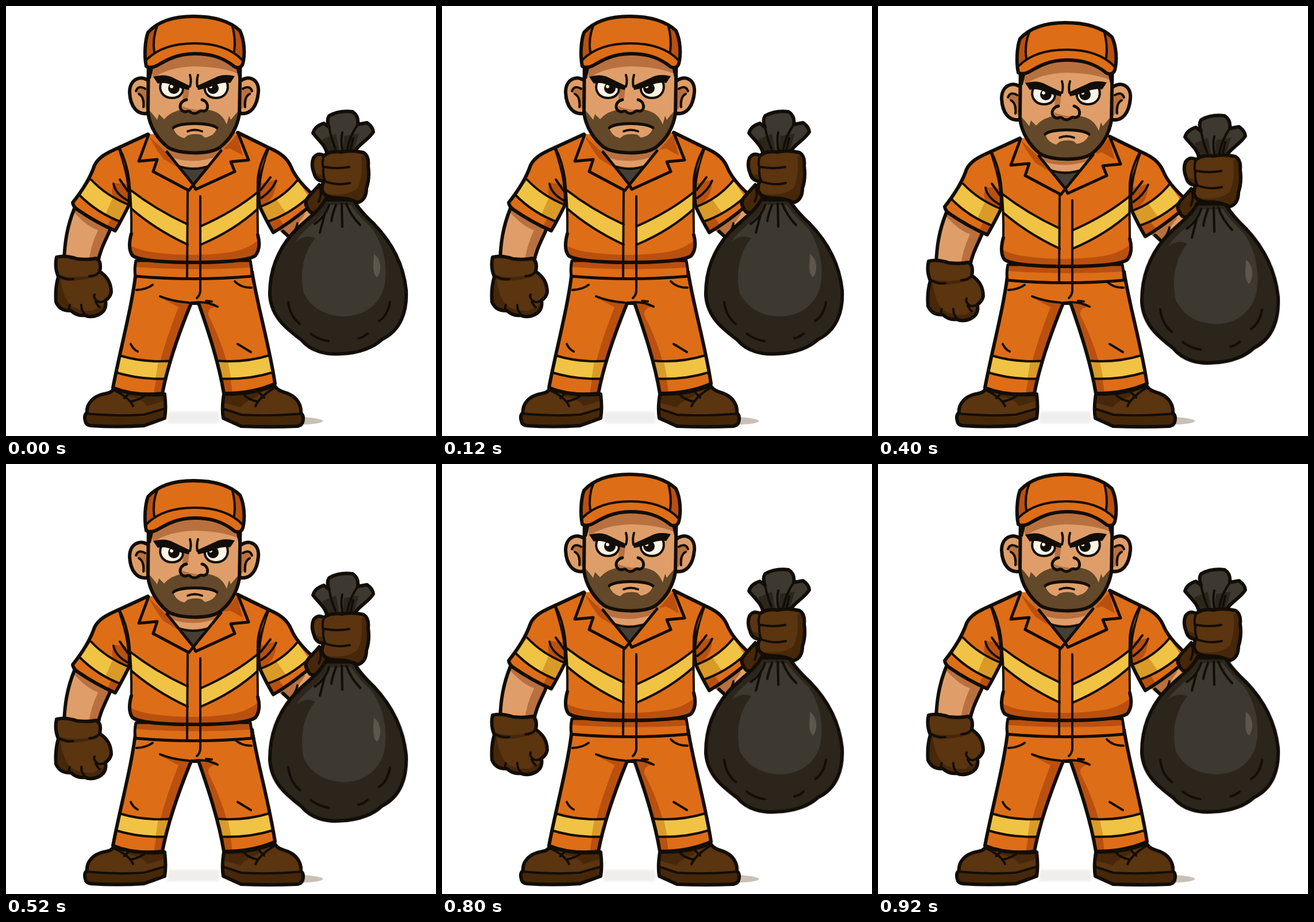
Write an HTML page that moves like this. It is 748 px wide and 748 px high and loops after 1000 ms.

```html
<!DOCTYPE html>
<html lang="en">
<head>
<meta charset="utf-8">
<title>Waste collector</title>
<style>
html, body { margin: 0; width: 100%; height: 100%; overflow: hidden; background: #fff; }
svg { display: block; width: 100vw; height: 100vh; }
.line { fill: none; stroke: #120d07; stroke-width: 4; stroke-linecap: round; stroke-linejoin: round; }
.edge { fill: none; stroke: #120d07; stroke-width: 6; stroke-linejoin: round; stroke-linecap: round; }
.orange { fill: #de6d17; }
.rust { fill: #b9500f; }
.yellow { fill: #f0c344; }
.gold { fill: #d99a28; }
.skin { fill: #df9e69; }
.tan { fill: #b9703f; }
.beard { fill: #63482a; }
.brown { fill: #5b3410; }
.umber { fill: #462709; }
.bag { fill: #2b251c; }
.sheen { fill: #3d3830; }
.ink { fill: #120d07; }
.body, .head, .sack { animation: 1s step-end infinite; }
.body { animation-name: body; }
.head { animation-name: head; }
.sack { animation-name: sack; transform-origin: 0 338px; }
@keyframes body {
  0%, 80%, 100% { transform: translateY(0); }
  20%, 60% { transform: translateY(4px); }
  40% { transform: translateY(7px); }
}
@keyframes head {
  0%, 80%, 100% { transform: translateY(0); }
  20%, 60% { transform: translateY(6.5px); }
  40% { transform: translateY(11px); }
}
@keyframes sack {
  0%, 20%, 60%, 80%, 100% { transform: scaleY(1); }
  40% { transform: scaleY(1.032); }
}
</style>
</head>
<body>
<svg viewBox="0 0 748 748">
<defs>
  <path id="legL" d="M226 462 C220 520 198 600 186 664 Q222 679 272 674 C282 620 302 566 322 517 L340 510 L340 462Z"/>
  <path id="legR" d="M320 462 L320 510 L335 517 C352 566 370 620 379 674 Q430 674 468 657 C458 590 437 520 428 462Z"/>
  <path id="bootL" d="M187 666 C183 675 173 673 163 677 C146 683 140 697 141 707 Q135 712 138 722 Q139 729 148 730 Q192 733 240 730 L276 717 Q279 700 276 675 Q230 680 187 666Z"/>
  <path id="bootR" d="M467 660 C474 672 486 671 494 676 C508 683 514 696 513 708 Q519 713 516 724 Q514 730 506 731 Q460 733 409 731 L378 717 Q375 700 379 675 Q430 676 467 660Z"/>
  <path id="armL" d="M119 352 C106 384 102 412 101 444 L160 446 C163 426 172 410 180 392 L186 370 L140 340Z"/>
  <path id="gloveL" d="M88 437 Q103 433 124 440 Q144 442 157 439 Q167 444 163 462 C174 469 183 480 183 498 Q181 507 173 512 Q176 530 161 537 Q148 543 137 538 Q124 540 113 530 Q94 531 87 515 Q85 491 91 471 Q84 454 88 437Z"/>
  <path id="torso" d="M247 223 L197 246 L214 302 Q220 350 218 396 Q211 422 220 434 Q236 446 327 446 Q418 446 434 434 Q444 421 438 398 Q437 350 438 302 L456 246 L403 220Z"/>
  <path id="sleeveL" d="M197 246 C174 256 161 263 154 277 C147 298 132 322 116 342 Q117 349 124 354 Q156 376 190 391 Q198 378 214 346 Q219 310 197 246Z"/>
  <path id="sleeveR" d="M456 246 C477 255 489 264 496 280 C504 300 520 316 536 330 L524 352 Q492 378 465 394 Q453 374 441 348 Q434 306 456 246Z"/>
  <path id="belt" d="M226 443 Q223 457 225 470 Q327 479 428 470 Q428 457 425 443Z"/>
  <path id="sackShape" d="M555 337 C546 357 518 374 498 396 C472 426 458 462 459 504 C462 542 489 562 514 581 C531 601 557 607 582 605 C616 604 640 593 654 580 C687 564 698 531 696 494 C691 447 669 409 640 379 Q615 356 604 337Z"/>
  <path id="tuft" d="M558 256 C556 242 541 231 534 221 Q537 209 553 204 L562 211 Q557 199 562 191 Q580 181 603 184 Q614 191 612 206 L628 203 Q638 210 639 219 C630 234 610 242 605 256Z"/>
  <path id="fist" d="M553 260 Q566 251 583 254 Q603 250 622 255 Q632 261 630 278 Q633 300 627 317 Q627 337 612 342 Q594 333 574 334 Q553 333 550 320 Q549 311 553 305 Q539 304 536 291 Q530 276 535 264 Q542 254 553 260Z"/>
  <path id="face" d="M248 76 L247 186 C250 210 264 232 282 246 C302 258 352 259 372 246 C391 231 402 211 406 188 L408 76Z"/>
  <path id="earL" d="M250 132 C238 119 215 125 215 150 C216 173 227 192 250 186Z"/>
  <path id="earR" d="M406 132 C419 119 441 125 439 150 C437 173 426 192 404 186Z"/>
  <path id="cap" d="M244 105 C240 86 242 59 247 46 C264 27 292 18 326 18 C362 18 390 27 407 43 C415 60 416 84 412 100 Q409 110 398 106 C376 88 354 83 328 83 C296 83 276 96 262 104 Q251 109 244 105Z"/>
  <clipPath id="cLegL"><use href="#legL"/></clipPath>
  <clipPath id="cLegR"><use href="#legR"/></clipPath>
  <clipPath id="cBootL"><use href="#bootL"/></clipPath>
  <clipPath id="cBootR"><use href="#bootR"/></clipPath>
  <clipPath id="cArmL"><use href="#armL"/></clipPath>
  <clipPath id="cGloveL"><use href="#gloveL"/></clipPath>
  <clipPath id="cTorso"><use href="#torso"/></clipPath>
  <clipPath id="cSleeveL"><use href="#sleeveL"/></clipPath>
  <clipPath id="cSleeveR"><use href="#sleeveR"/></clipPath>
  <clipPath id="cFist"><use href="#fist"/></clipPath>
  <clipPath id="cFace"><use href="#face"/></clipPath>
  <clipPath id="cCap"><use href="#cap"/></clipPath>
  <filter id="soft"><feGaussianBlur stdDeviation="2"/></filter>
</defs>

<!-- ground -->
<rect x="281" y="706" width="90" height="20" fill="#f0eeec" filter="url(#soft)"/>
<path d="M512 715 Q545 716 552 722 Q545 728 512 728Z" fill="#c9c0b6"/>

<!-- legs -->
<use href="#legL" class="orange"/>
<g clip-path="url(#cLegL)">
  <path class="rust" d="M268 507 L322 517 L272 676 L257 676 C264 622 282 570 300 524Z"/>
  <path class="yellow" d="M199 608 Q240 621 288 617 L284 648 Q235 651 190 637Z"/>
  <path class="gold" d="M265 618 L288 617 L284 648 L260 649Z"/>
  <path class="line" d="M198 608 Q240 621 290 617 M190 637 Q235 651 284 648"/>
</g>
<use href="#legR" class="orange"/>
<g clip-path="url(#cLegR)">
  <path class="rust" d="M320 514 L367 522 Q350 526 352 538 C375 584 390 626 394 676 L370 676Z"/>
  <path class="yellow" d="M366 617 Q415 621 457 608 L465 637 Q420 651 370 648Z"/>
  <path class="gold" d="M366 617 L386 619 L392 649 L370 648Z"/>
  <path class="line" d="M366 617 Q415 621 457 608 M370 648 Q420 651 465 637"/>
</g>
<path class="edge" d="M226 462 C220 520 198 600 186 664 Q222 679 272 674 C282 620 302 566 322 517 L335 517 C352 566 370 620 379 674 Q430 674 468 657 C458 590 437 520 428 462"/>
<path class="line" d="M227 494 Q245 493 255 485 M398 479 Q408 490 427 490 M338 470 L338 496 Q337 504 332 508 M268 505 Q290 514 318 516 M326 516 Q348 513 368 523 M348 513 L358 514"/>
<path class="line" d="M217 588 Q221 597 229 601 M403 588 L426 602"/>

<!-- boots -->
<use href="#bootL" class="brown"/>
<g clip-path="url(#cBootL)">
  <path class="umber" d="M214 672 L278 672 L278 686 L246 696 Q236 682 214 680Z M139 711 L240 714 L278 702 L278 732 L136 732Z"/>
  <path class="line" d="M138 709 Q190 714 240 711 L278 700 M187 668 Q215 681 221 696 M206 682 L214 674 M217 688 Q236 684 243 676"/>
</g>
<use href="#bootL" class="edge"/>
<use href="#bootR" class="brown"/>
<g clip-path="url(#cBootR)">
  <path class="umber" d="M378 674 L442 668 L438 680 Q420 684 408 698 L378 690Z M378 701 L409 713 L518 711 L518 732 L378 732Z"/>
  <path class="line" d="M376 700 L409 711 Q460 714 517 709 M467 664 Q441 680 434 696 M437 688 Q420 684 414 676 M449 681 L441 673"/>
</g>
<use href="#bootR" class="edge"/>

<g class="body">
  <!-- bare arm and lowered glove -->
  <use href="#armL" class="skin"/>
  <path class="tan" clip-path="url(#cArmL)" d="M112 352 Q140 384 160 390 Q146 420 144 446 L164 446 L190 390 L140 340Z"/>
  <use href="#armL" class="edge"/>
  <use href="#gloveL" class="brown"/>
  <g clip-path="url(#cGloveL)">
    <path class="umber" d="M88 466 Q122 478 162 464 L160 470 Q120 482 95 476 Q99 505 112 521 Q130 532 152 530 L176 516 L176 545 L84 545 L82 480Z"/>
    <path class="line" d="M93 470 Q104 477 117 475 M145 470 Q155 470 161 464 M173 512 Q166 517 160 514 Q151 508 154 502 M156 514 Q160 522 163 524 M131 520 Q131 531 138 537 M111 520 Q108 527 113 531"/>
  </g>
  <use href="#gloveL" class="edge"/>

  <!-- raised forearm -->
  <path class="skin" d="M474 390 L520 346 L540 350 L512 400 L498 408Z"/>
  <path class="tan" d="M474 390 L516 352 L520 362 L492 402Z"/>
  <path class="edge" d="M482 392 L498 407"/>
  <path class="line" d="M501 393 Q506 385 507 378"/>

  <!-- jacket -->
  <use href="#belt" class="orange"/>
  <path class="rust" d="M226 446 L425 446 L427 455 Q327 461 226 454Z"/>
  <use href="#belt" class="edge" style="stroke-width:5"/>
  <use href="#sleeveL" class="orange"/>
  <g clip-path="url(#cSleeveL)">
    <path class="rust" d="M188 308 Q178 330 196 340 L174 388 L196 400 L222 340 L214 310Z"/>
    <path class="yellow" d="M149 302 Q174 330 214 346 L200 376 Q158 360 127 328Z"/>
    <path class="gold" d="M185 335 L216 347 L200 378 L172 365Z"/>
    <path class="line" d="M148 302 Q174 330 214 346 M127 328 Q158 360 201 376"/>
  </g>
  <use href="#sleeveL" class="edge"/>
  <use href="#sleeveR" class="orange"/>
  <g clip-path="url(#cSleeveR)">
    <path class="rust" d="M470 302 Q470 330 454 342 L486 384 L464 400 L436 346 L440 310Z"/>
    <path class="yellow" d="M507 303 Q480 336 440 350 L455 375 Q494 362 526 331Z"/>
    <path class="gold" d="M470 336 L440 350 L455 375 L488 361Z"/>
    <path class="line" d="M507 303 Q480 336 440 350 M455 375 Q494 362 528 331"/>
  </g>
  <use href="#sleeveR" class="edge"/>

  <use href="#torso" class="orange"/>
  <g clip-path="url(#cTorso)">
    <path class="rust" d="M210 412 Q226 426 270 430 Q330 437 392 428 Q426 422 444 402 L444 450 L210 450Z"/>
    <path class="yellow" d="M215 319 Q260 354 316 380 L316 415 Q258 388 215 350Z M339 383 Q398 357 440 322 L440 351 Q398 390 339 415Z"/>
    <path class="line" d="M215 319 Q260 354 316 380 M316 415 Q258 388 215 350 M339 383 Q398 357 440 322 M440 351 Q398 390 339 415"/>
  </g>
  <path class="line" d="M197 246 Q210 272 214 302 Q219 350 218 396 M456 246 Q440 276 438 302 Q437 350 438 398"/>
  <path class="edge" d="M218 396 Q211 422 220 434 Q236 446 327 446 Q418 446 434 434 Q444 421 438 398 M247 223 L197 246 M403 220 L456 246"/>
  <path class="line" d="M316 320 L315 474 M338 331 L338 474 M187 309 Q190 326 211 338 M198 302 L212 322 M470 304 Q462 322 444 334 M460 298 L443 320"/>

  <!-- neck and collar -->
  <path class="tan" d="M262 236 L392 232 L348 282 Q326 288 304 281Z"/>
  <path class="skin" d="M284 262 Q326 278 372 260 L354 276 Q326 284 300 277Z"/>
  <path d="M299 280 Q326 289 356 279 L326 312Z" fill="#453e34"/>
  <path class="line" d="M299 278 Q326 289 357 277"/>
  <path class="orange" d="M248 224 L231 270 L263 267 L256 288 L318 320 L326 312 L280 254Z M403 220 L422 268 L391 271 L398 288 L329 320 L326 312 L374 252Z"/>
  <path class="rust" d="M249 227 L276 252 L298 281 L274 266 Q262 252 249 227Z M402 223 L378 250 L390 248 L412 260Z"/>
  <path class="line" style="stroke-width:5" d="M248 224 L231 270 L263 267 L256 288 L318 321 L326 311 L280 254 M403 220 L422 268 L391 271 L398 288 L330 319 L326 311 L374 252"/>

  <!-- gripping glove and sack -->
  <path class="umber" d="M545 311 L527 331 Q517 342 525 352 Q528 362 540 360 L558 344 L556 320Z"/>
  <path class="edge" d="M545 311 L527 331 Q517 342 525 352 Q528 362 540 360 L558 344 L556 320Z"/>
  <path class="line" d="M546 316 Q550 328 544 340"/>
  <g class="sack">
    <use href="#sackShape" class="bag"/>
    <path class="sheen" d="M560 346 C550 372 520 384 504 410 Q522 396 538 404 C518 428 510 462 518 500 Q538 538 586 540 C624 540 650 519 658 488 C666 450 654 410 636 386 Q610 362 600 346Z"/>
    <path d="M640 431 Q652 440 651 457 Q650 468 645 472 Q638 466 639 450Z" fill="#5c564d"/>
    <use href="#sackShape" class="edge"/>
    <path class="line" d="M491 515 Q494 540 511 553 M530 570 Q543 580 561 583 M668 515 Q664 538 649 548 M629 570 Q620 577 613 578 M562 346 Q556 366 537 379 M574 346 Q567 364 566 374 M584 344 L585 384 M592 344 Q600 365 616 381 M555 360 L546 394"/>
  </g>
  <use href="#tuft" class="sheen"/>
  <path class="bag" d="M550 232 L574 222 L580 254 L560 254Z M588 226 L614 222 L604 254 L586 254Z"/>
  <use href="#tuft" class="edge"/>
  <path class="line" d="M562 211 Q566 232 573 248 M585 250 Q582 232 585 220 M612 206 Q598 226 594 248 M604 230 L600 248"/>
  <use href="#fist" class="brown"/>
  <path class="umber" clip-path="url(#cFist)" d="M536 290 L553 295 L553 306 L536 304Z M618 262 L634 254 L634 344 L596 346 Q550 340 548 325 Q592 334 612 316 Q622 292 618 262Z"/>
  <use href="#fist" class="edge"/>
  <path class="line" d="M553 261 Q549 271 552 282 Q551 294 555 304 M555 280 Q575 284 597 280 M555 305 Q575 313 598 308"/>
</g>

<!-- head -->
<g class="head">
  <use href="#earL" class="skin"/>
  <use href="#earR" class="skin"/>
  <path class="tan" d="M245 142 Q229 136 226 150 L236 158 Q234 172 246 180Z M410 142 Q425 136 429 150 L419 158 Q421 172 409 180Z"/>
  <use href="#earL" class="edge"/>
  <use href="#earR" class="edge"/>
  <path class="line" d="M242 144 Q230 137 226 148 M231 153 Q241 158 239 176 M412 144 Q424 137 428 148 M424 153 Q414 158 416 176"/>
  <use href="#face" class="skin"/>
  <g clip-path="url(#cFace)">
    <path class="tan" d="M244 76 L412 76 L412 122 Q384 106 328 105 Q284 106 256 125Z M308 146 L319 142 L317 160 L307 168Z"/>
    <path class="beard" d="M244 176 Q254 186 263 198 L266 188 L275 197 Q287 183 308 180 L328 186 L348 180 Q370 182 380 198 L384 206 L388 191 L391 198 Q399 188 410 176 L410 264 L244 264Z"/>
    <path class="ink" d="M246 100 L257 104 L252 126 L246 128Z M410 98 L400 106 L405 128 L410 128Z"/>
    <path class="skin" d="M291 212 Q302 204 328 204 Q355 204 367 212 Q363 226 346 229 L340 224 Q328 221 316 225 L310 230 Q295 226 291 212Z"/>
  </g>
  <use href="#face" class="edge"/>
  <path class="line" style="stroke-width:5" d="M291 212 C302 202 354 202 367 212"/>
  <path class="line" d="M316 218 Q328 213 341 218"/>

  <g fill="#fbf4e6" stroke="#120d07" stroke-width="4">
    <path d="M270 132 C264 148 274 160 289 160 C304 160 311 148 306 138 L286 128Z"/>
    <path d="M384 131 C390 148 380 160 365 160 C350 160 343 148 347 138 L367 128Z"/>
  </g>
  <circle class="ink" cx="292" cy="143" r="10"/>
  <circle class="ink" cx="360" cy="143" r="10"/>
  <circle cx="288" cy="140" r="3" fill="#fbf4e6"/>
  <circle cx="356" cy="140" r="3" fill="#fbf4e6"/>
  <path class="ink" d="M256 123 Q277 117 291 125 L320 139 L318 146 Q300 143 285 136 Q272 132 264 135Z M398 122 Q377 117 363 125 L332 139 L334 146 Q352 143 368 136 Q382 132 390 134Z"/>
  <path class="line" d="M320 120 Q323 130 320 140 M334 120 Q331 130 333 140"/>

  <path class="skin" d="M315 162 C300 164 299 184 313 184 Q318 181 322 185 Q328 189 334 185 Q338 181 343 183 C354 182 354 165 340 162Z"/>
  <path class="tan" d="M306 174 Q307 182 314 181 Q320 179 328 185 Q334 185 338 181 Q320 180 306 174Z"/>
  <path class="line" style="stroke-width:5" d="M314 163 C299 166 300 184 313 184 Q318 181 322 185 Q328 189 334 185 Q338 181 343 183 C354 182 353 166 341 163"/>

  <use href="#cap" class="orange"/>
  <g clip-path="url(#cCap)">
    <path class="rust" d="M240 40 L262 36 Q254 60 258 79 L242 94Z M394 33 L416 40 L414 98 L397 79 Q400 56 394 33Z"/>
    <path class="line" d="M264 32 Q254 56 258 81 M393 32 Q400 56 397 79 M245 93 C264 74 294 65 328 65 C364 65 392 74 411 94"/>
  </g>
  <use href="#cap" class="edge"/>
</g>
</svg>
</body>
</html>
```
